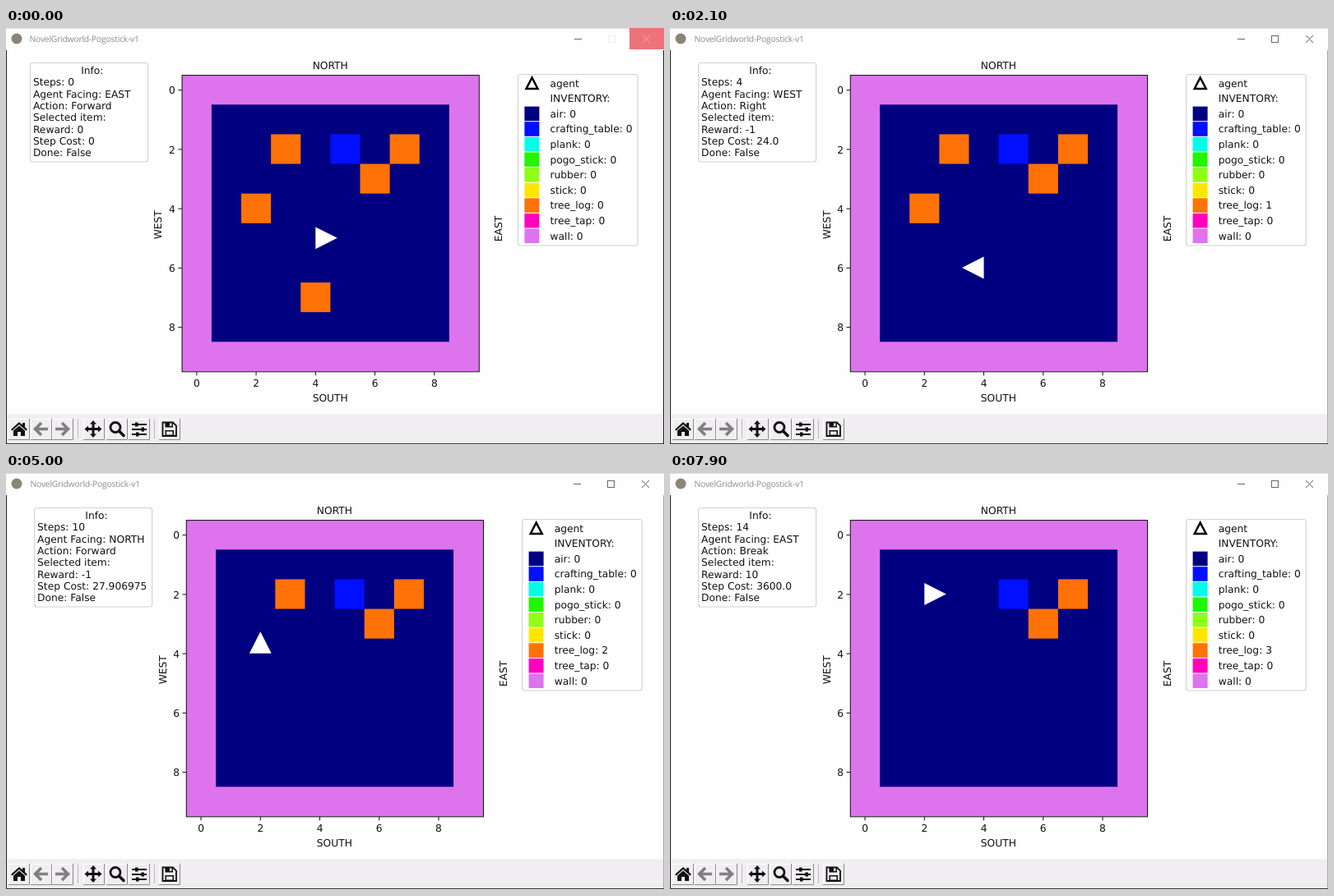
Recreate the animation shown at these times as an HTML page. Size 800x508 px, loop 8000 ms.

```html
<!DOCTYPE html>
<html lang="en">
<head>
<meta charset="utf-8">
<title>NovelGridworld-Pogostick-v1</title>
<style>
  html, body { margin: 0; width: 100%; height: 100%; overflow: hidden; background: #fff; }
  svg { display: block; width: 800px; height: 508px; }
  text {
    font: 12.25px "DejaVu Sans", sans-serif; fill: #111;
    white-space: pre; text-rendering: geometricPrecision;
  }
  .mid { text-anchor: middle; }
  .end { text-anchor: end; }
  .title { font: 10.4px "Open Sans", sans-serif; letter-spacing: -.25px; fill: #8c8c8c; }
  .line { fill: none; stroke: #111; }
  .frame { fill: #fff; stroke: #d2d2d2; stroke-width: 1.2; }
  .chrome { fill: none; stroke: #666; }
</style>
</head>
<body>
<svg viewBox="0 0 800 508">
  <rect width="800" height="508" fill="#fefefe"/>
  <path d="M0 .5H800" stroke="#ddd"/>
  <circle cx="13" cy="13" r="6.5" fill="#8a8577"/>
  <text id="title" class="title" y="17">NovelGridworld-Pogostick-v1</text>

  <g id="idle" class="chrome">
    <path d="M690 13.5H699M773 9L782 18M782 9L773 18"/>
    <rect x="731.5" y="9.5" width="8" height="8"/>
  </g>
  <g id="hover" class="chrome">
    <path d="M691 13.5H700"/>
    <rect x="732.5" y="9.5" width="8" height="8" stroke="#eee"/>
    <rect x="758" width="42" height="26" fill="#ee7379" stroke="none"/>
    <path d="M774 9L783 18M783 9L774 18" stroke="#f6b0b4"/>
  </g>

  <g id="scene">
    <rect class="frame" x="29.5" y="42.5" width="143" height="120.5" rx="3"/>
    <text class="mid" x="104.8" y="56">Info:</text>
    <g id="info"></g>
    <g id="board"></g>
    <path id="agent" d="M0 -13.4L26.5 0L0 13.4Z" fill="#fff"/>
    <g id="axes"></g>
    <text class="mid" x="394.2" y="49.8">NORTH</text>
    <text class="mid" x="394.2" y="454.6">SOUTH</text>
    <text class="mid" transform="translate(189.3 239.8) rotate(-90)">WEST</text>
    <text class="mid" transform="translate(603.3 244.5) rotate(-90)">EAST</text>
    <rect class="frame" x="622.5" y="56.5" width="145.5" height="208.5" rx="3"/>
    <path d="M639.5 60.5L646.5 74H632.5Z" fill="#fff" stroke="#000" stroke-width="2.5"/>
    <g id="legend"></g>
  </g>

  <rect y="470.5" width="800" height="35.5" fill="#f0eef0"/>
  <path d="M87.5 477V500M180.5 477V500" stroke="#bbb"/>
  <g id="buttons"></g>
  <g id="icons" fill="#111">
    <path d="M6 489L16 480L20 483.5V481H23V486.3L26 489L24.5 490.5L16 483L7.5 490.5Z"/>
    <path d="M9 490.5L16 484.5L23 490.5V497H18V492H14V497H9Z"/>
    <path d="M43 481L35.5 488.5L43 496M36 488.5H51M68 481L75.5 488.5L68 496M75 488.5H60"
      fill="none" stroke="#808080" stroke-width="3.6"/>
    <path d="M106 478L110 482.5H107.5V487H112V484.5L116.5 488.5L112 492.5V490H107.5V494.5H110L106 499L102 494.5H104.5V490H100V492.5L95.5 488.5L100 484.5V487H104.5V482.5H102Z"/>
    <circle cx="133" cy="486.5" r="6" fill="none" stroke="#111" stroke-width="2.8"/>
    <path d="M137.5 491L143 496.5" stroke="#111" stroke-width="3.6" stroke-linecap="round"/>
    <path d="M153 483H171M153 489H171M153 495H171" stroke="#111" stroke-width="1.8"/>
    <path d="M157 480.5h3.5v5h-3.5zM164.5 486.5h3.5v5h-3.5zM158 492.5h3.5v5h-3.5z"/>
    <path d="M190.5 480.5H203L207 484.5V497H190.5Z" fill="none" stroke="#111" stroke-width="1.8"/>
    <path d="M193.5 481H203V486.5H193.5ZM193.5 490H204V497H193.5Z"/>
    <path d="M199 481.5h2.5v3.5h-2.5zM195 491.5h7.5v4h-7.5z" fill="#f0eef0"/>
  </g>
  <path d="M0 506.5H800M.5 27V506" stroke="#222"/>
  <path id="edge" d="M799.5 27V506"/>
</svg>

<script>
const LOOP = 8000, HOVER_END = 300;
const LEFT = 213.8, TOP = 57.2, CELL = 36.12;
const AIR = "#000080", LOG = "#ff7208", TABLE = "#0010ff", WALL = "#de73ee";
const HEADINGS = ["EAST", "SOUTH", "WEST", "NORTH"];
const MOVES = [[1, 0], [0, 1], [-1, 0], [0, -1]];
const COSTS = { Forward: "27.906975", Right: "24.0", Break: "3600.0" };
const SCRIPT = [
  [500, "Right"], [1100, "Forward"], [1600, "Break"], [2000, "Right"],
  [2500, "Forward"], [3000, "Forward"], [3500, "Right"], [3800, "Forward"],
  [4600, "Break"], [4900, "Forward"], [5500, "Forward"], [6100, "Forward"],
  [6700, "Right"], [7100, "Break"]
];
const ITEMS = [
  ["air", AIR], ["crafting_table", TABLE], ["plank", "#00ffe6"],
  ["pogo_stick", "#22f500"], ["rubber", "#8fff15"], ["stick", "#ffe600"],
  ["tree_log", LOG], ["tree_tap", "#ff00bf"], ["wall", WALL]
];

const $ = id => document.getElementById(id);

function add(parent, tag, attrs, content = "") {
  const node = document.createElementNS("http://www.w3.org/2000/svg", tag);
  for (const key in attrs) node.setAttribute(key, attrs[key]);
  node.textContent = content;
  return $(parent).appendChild(node);
}

const gridX = c => LEFT + CELL * (c + 0.5);
const gridY = r => TOP + CELL * (r + 0.5);

function block(c, r, fill, size = 1) {
  return add("board", "rect", {
    x: gridX(c - 0.5), y: gridY(r - 0.5), width: CELL * size, height: CELL * size, fill
  });
}

block(0, 0, WALL, 10);
block(1, 1, AIR, 8);
block(5, 2, TABLE);
const logs = [[3, 2], [7, 2], [6, 3], [2, 4], [4, 7]]
  .map(([x, y]) => ({ x, y, node: block(x, y, LOG) }));

const bottom = TOP + CELL * 10 + 0.4;
add("axes", "rect", {
  class: "line", x: LEFT + 0.3, y: TOP + 0.4, width: CELL * 10, height: CELL * 10
});
for (let n = 0; n < 10; n += 2) {
  const x = gridX(n), y = gridY(n) + 0.4;
  add("axes", "path", { class: "line", d: `M${x} ${bottom}v4.5M${LEFT} ${y}h-4.5` });
  add("axes", "text", { class: "mid", x, y: 437 }, n);
  add("axes", "text", { class: "end", x: 205.8, y: y + 4.6 }, n);
}

const rowY = i => 67.2 + 18.61 * i;
["agent", "INVENTORY:"].forEach((label, i) =>
  add("legend", "text", { x: 661.5, y: rowY(i) + 4.3 }, label));
const counts = {};
ITEMS.forEach(([name, fill], i) => {
  const y = rowY(i + 2);
  add("legend", "rect", { x: 630.4, y: y - 8.8, width: 18, height: 17.6, fill });
  counts[name] = add("legend", "text", { x: 661.5, y: y + 4.3 }, `${name}: 0`);
});

const infoLines = Array.from({ length: 7 }, (_, i) =>
  add("info", "text", { x: 32.9, y: 70.2 + 14.38 * i }));

for (const x of [3, 30, 56, 94, 122, 149, 186]) {
  add("buttons", "path", { d: `M${x + 0.5} 501V476.5H${x + 25}`, fill: "none", stroke: "#fff" });
  add("buttons", "path", { d: `M${x} 501.5H${x + 25.5}V476`, fill: "none", stroke: "#8c8c8c" });
}

// Replays the actions to list the world after every step.
function simulate() {
  let state = { at: 0, step: 0, x: 4, y: 5, dir: 0, action: "Forward", reward: 0, cost: "0", gone: [] };
  const states = [state];
  SCRIPT.forEach(([at, action], i) => {
    const next = { ...state, at, action, step: i + 1, reward: -1, cost: COSTS[action] };
    const [dx, dy] = MOVES[state.dir];
    const x = state.x + dx, y = state.y + dy;
    if (action === "Right") next.dir = (state.dir + 1) % 4;
    if (action === "Forward") Object.assign(next, { x, y });
    if (action === "Break") {
      next.reward = 10;
      next.gone = [...state.gone, logs.find(log => log.x === x && log.y === y)];
    }
    states.push(state = next);
  });
  return states;
}

const states = simulate();
let shown = null;

function show(s) {
  // The plot layout settles to the right over the first few steps.
  const shift = s.step === 0 ? 0 : s.step < 3 ? 2.6 : 5.2;
  $("scene").setAttribute("transform", `translate(${shift} 0)`);
  $("agent").setAttribute("transform",
    `translate(${gridX(s.x)} ${gridY(s.y)}) rotate(${s.dir * 90})`);
  for (const log of logs) log.node.style.display = s.gone.includes(log) ? "none" : "";
  counts.tree_log.textContent = `tree_log: ${s.gone.length}`;
  [
    `Steps: ${s.step}`, `Agent Facing: ${HEADINGS[s.dir]}`, `Action: ${s.action}`,
    "Selected item:", `Reward: ${s.reward}`, `Step Cost: ${s.cost}`, "Done: False"
  ].forEach((line, i) => { infoLines[i].textContent = line; });
}

function draw(now) {
  const t = now % LOOP;
  const state = states.findLast(s => s.at <= t) || states[0];
  if (state !== shown) show(shown = state);
  const hover = t < HOVER_END;
  $("hover").style.display = hover ? "" : "none";
  $("idle").style.display = hover ? "none" : "";
  $("title").setAttribute("x", hover ? 28.5 : 29.5);
  $("edge").setAttribute("stroke", hover ? "#222" : "#aaa");
}

const start = performance.now();
function tick() {
  draw(performance.now() - start);
  requestAnimationFrame(tick);
}
tick();
</script>
</body>
</html>
```
